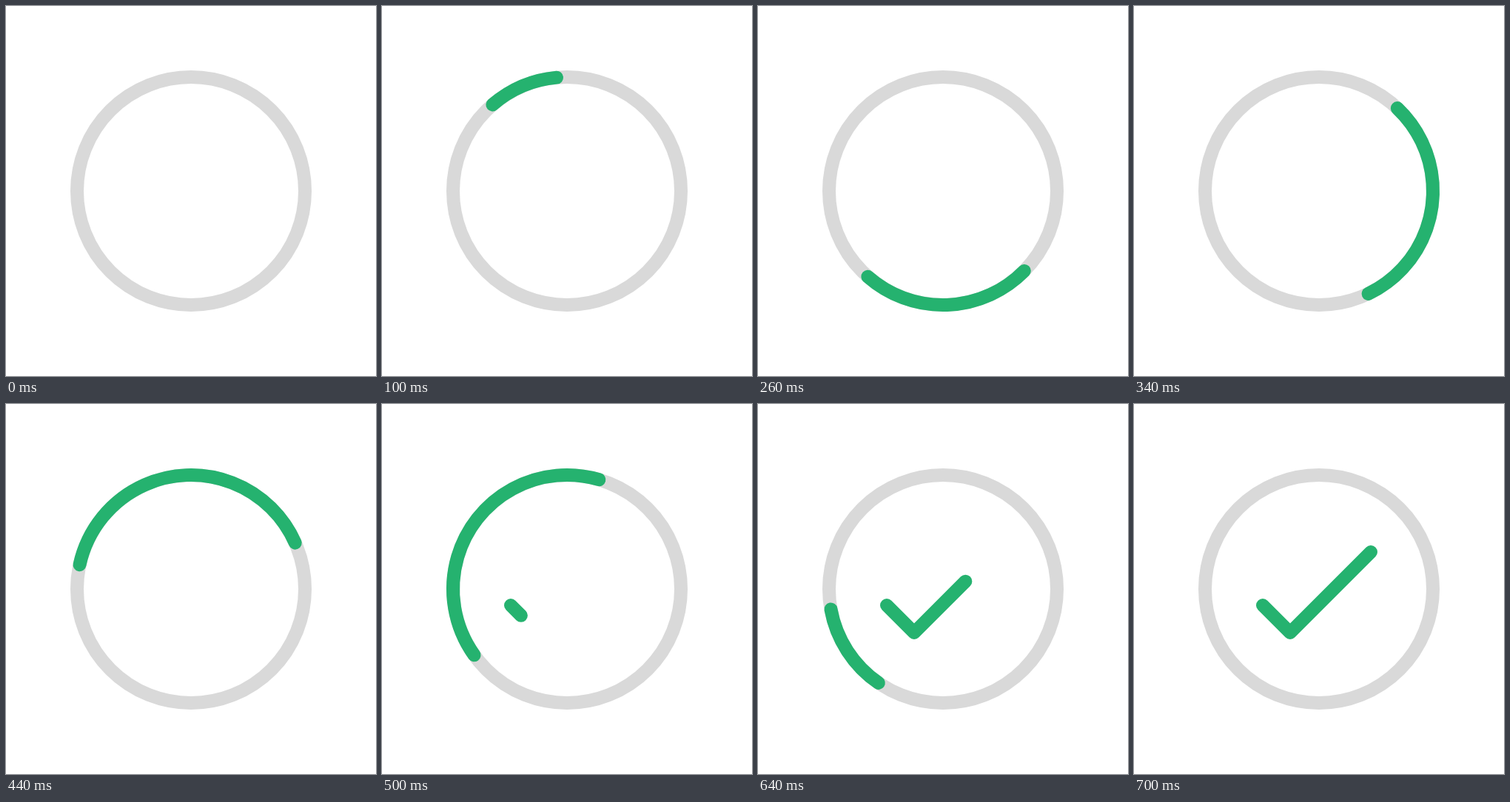
Write an HTML page with a canvas that moves like this. It is 500 by 500 pixels and loops after 1060 ms.

```html
<!DOCTYPE html>
<html lang="en">
<head>
<meta charset="utf-8">
<title>Loading done</title>
<style>
  html, body { margin: 0; width: 100%; height: 100%; overflow: hidden; background: #fff; }
  canvas { display: block; width: 500px; height: 500px; }
</style>
</head>
<body>
<canvas id="stage" width="500" height="500"></canvas>
<script>
const ctx = document.getElementById('stage').getContext('2d');
const LOOP = 1060, STEP = 20, DONE = 700, CHECK_START = 479;
const GREY = '#d9d9d9', GREEN = '#25b26f';
const CENTER = 250, RADIUS = 154;

// [ms, degrees], counter-clockwise from the right
const TAIL = [[0, 11.8], [100, 95.2], [260, 228.7], [340, 295.6], [440, 383.9], [560, 483.4], [700, 600.4]];
const HEAD = [[0, 15.4], [100, 130.8], [260, 315.5], [340, 406.6], [440, 527.7], [479, 572.4], [560, 584.2], [700, 604]];
const CHECK = [[174, 272], [211, 309], [320, 200]];

ctx.lineWidth = 18;
ctx.lineCap = ctx.lineJoin = 'round';

function track(keys, t) {
  let i = 1;
  while (i < keys.length - 1 && t > keys[i][0]) i++;
  const [t0, a] = keys[i - 1], [t1, b] = keys[i];
  return a + (b - a) * (t - t0) / (t1 - t0);
}

function arc(from, to, color) {
  const rad = deg => -deg * Math.PI / 180;
  ctx.strokeStyle = color;
  ctx.beginPath();
  ctx.arc(CENTER, CENTER, RADIUS, rad(from), rad(to), true);
  ctx.stroke();
}

// Strokes the first part of a polyline, by share of its length
function trace(points, share, color) {
  const dist = (p, q) => Math.hypot(q[0] - p[0], q[1] - p[1]);
  let left = 0;
  for (let i = 1; i < points.length; i++) left += dist(points[i - 1], points[i]);
  left *= share;
  ctx.strokeStyle = color;
  ctx.beginPath();
  ctx.moveTo(...points[0]);
  for (let i = 1; i < points.length && left > 0; i++) {
    const [p, q] = [points[i - 1], points[i]];
    const len = dist(p, q), k = Math.min(1, left / len);
    ctx.lineTo(p[0] + (q[0] - p[0]) * k, p[1] + (q[1] - p[1]) * k);
    left -= len;
  }
  ctx.stroke();
}

function draw(t) {
  ctx.fillStyle = '#fff';
  ctx.fillRect(0, 0, 500, 500);
  arc(0, 360, GREY);
  if (t > 0 && t < DONE) arc(track(TAIL, t), track(HEAD, t), GREEN);
  if (t > CHECK_START) {
    trace(CHECK, Math.min(1, (t - CHECK_START) / (DONE - CHECK_START)), GREEN);
  }
}

const start = performance.now();
function tick() {
  const t = (performance.now() - start) % LOOP;
  draw(Math.floor((t + 3) / STEP) * STEP % LOOP);
  requestAnimationFrame(tick);
}
tick();
</script>
</body>
</html>
```
